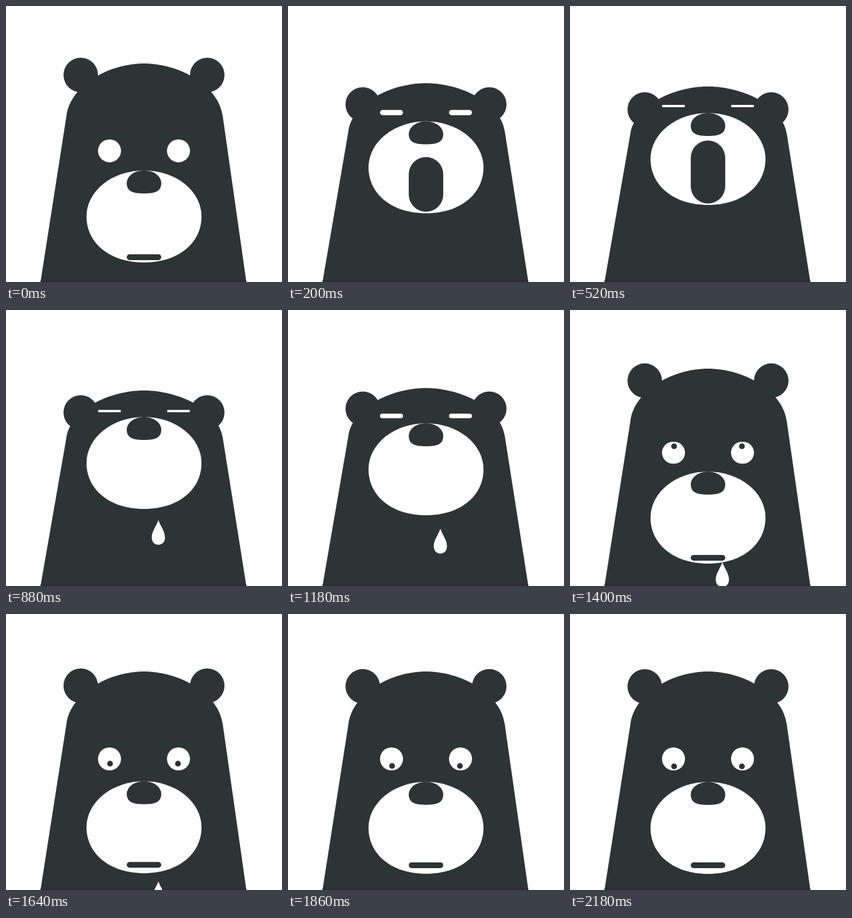
An HTML page with a canvas that plays this animation: 480x480 px, repeating every 2.88 s.

```html
<!DOCTYPE html>
<html lang="en">
<head>
<meta charset="utf-8">
<title>Bear</title>
<style>
  html, body { margin: 0; width: 100%; height: 100%; overflow: hidden; background: #fff; }
  canvas { display: block; width: 480px; height: 480px; }
</style>
</head>
<body>
<canvas id="stage" width="480" height="480"></canvas>
<script>
const ctx = document.getElementById('stage').getContext('2d');
const LOOP = 2880;
const DARK = '#2d3436', WHITE = '#fff', FLOOR = '#2d2b38';

// Solves a CSS-style cubic bezier by bisection.
function bezier(x1, y1, x2, y2) {
  const at = (a, b, u) => 3 * a * u * (1 - u) ** 2 + 3 * b * u * u * (1 - u) + u ** 3;
  return x => {
    if (x <= 0) return 0;
    if (x >= 1) return 1;
    let lo = 0, hi = 1;
    for (let i = 0; i < 24; i++) {
      const mid = (lo + hi) / 2;
      if (at(x1, x2, mid) < x) lo = mid; else hi = mid;
    }
    return at(y1, y2, lo);
  };
}

const ease = bezier(0.25, 0.1, 0.25, 1);
const settle = bezier(0.1, 0.9, 0.2, 1);

// Yawn, hold, wake, look down.
const steps = [
  { from: 0, to: 360, curve: ease },
  { from: 540, to: 1080, curve: ease },
  { from: 1142, to: 1500, curve: ease },
  { from: 1500, to: 2180, curve: settle }
];

const tracks = {
  head:   [100, 140, 140, 100, 100],
  ear:    [120, 180, 178, 120, 126],
  eye:    [252, 174, 176, 252, 252],
  eyeH:   [40, 4, 4, 40, 40],
  pupil:  [160, 160, 160, 241, 265],
  muzzle: [286, 186, 186, 286, 292],
  mouth:  [432, 234, 385, 428, 432],
  mouthH: [10, 109.5, 10, 10, 10],
  drop:   [290, 290, 373, 442, 516]
};

function valueAt(name, t) {
  const keys = tracks[name];
  let v = keys[0];
  steps.forEach((s, i) => {
    const curve = name === 'drop' ? ease : s.curve;
    v += (keys[i + 1] - keys[i]) * curve((t - s.from) / (s.to - s.from));
  });
  return v;
}

function fill(color, path) {
  ctx.fillStyle = color;
  ctx.fill(path);
}

function disc(x, y, r) {
  const p = new Path2D();
  p.arc(x, y, r, 0, Math.PI * 2);
  return p;
}

function pill(x, y, w, h) {
  const p = new Path2D();
  p.roundRect(x, y, w, h, Math.min(w, h) / 2);
  return p;
}

function placed(shape, x, y, scaleY = 1) {
  const p = new Path2D();
  p.addPath(shape, new DOMMatrix([1, 0, 0, scaleY, x, y]));
  return p;
}

// The body hangs from y = -380 down to its base at 0.
const body = new Path2D(
  'M60 0 L105 -288 C112 -343 180 -380 240 -380 C300 -380 370 -343 377 -288 L418 0 Z');
const snout = new Path2D(
  'M-100 80 A100 80 0 0 1 100 80 C100 126 60 160 0 160 C-60 160 -100 126 -100 80 Z');
const nose = new Path2D(
  'M-30 22 A30 22 0 0 1 30 22 C30 36 20 40 0 40 C-20 40 -30 36 -30 22 Z');
const tear = new Path2D(
  'M0 0 C4 11 11.5 20 11.5 30 C11.5 38 7 43 0 43 C-7 43 -11.5 38 -11.5 30 C-11.5 20 -4 11 0 0 Z');

function draw(t) {
  const v = {};
  for (const name in tracks) v[name] = valueAt(name, t);

  ctx.fillStyle = WHITE;
  ctx.fillRect(0, 0, 480, 480);

  fill(DARK, placed(body, 0, 480, (480 - v.head) / 380));
  ctx.fillStyle = FLOOR;
  ctx.fillRect(60, 477, 358, 3);
  for (const x of [130, 350]) fill(DARK, disc(x, v.ear, 30));

  for (const x of [180, 300]) fill(WHITE, pill(x - 20, v.eye - v.eyeH / 2, 40, v.eyeH));
  for (const x of [181, 299]) fill(DARK, disc(x, v.pupil, 5));

  fill(WHITE, placed(tear, 265, v.drop));

  const muzzle = placed(snout, 240, v.muzzle);
  fill(WHITE, muzzle);
  fill(DARK, placed(nose, 240, v.muzzle));
  ctx.save();
  ctx.clip(muzzle);
  fill(DARK, pill(210, v.mouth, 60, v.mouthH));
  ctx.restore();
}

const start = performance.now();
function tick() {
  draw((performance.now() - start) % LOOP);
  requestAnimationFrame(tick);
}
tick();
</script>
</body>
</html>
```
